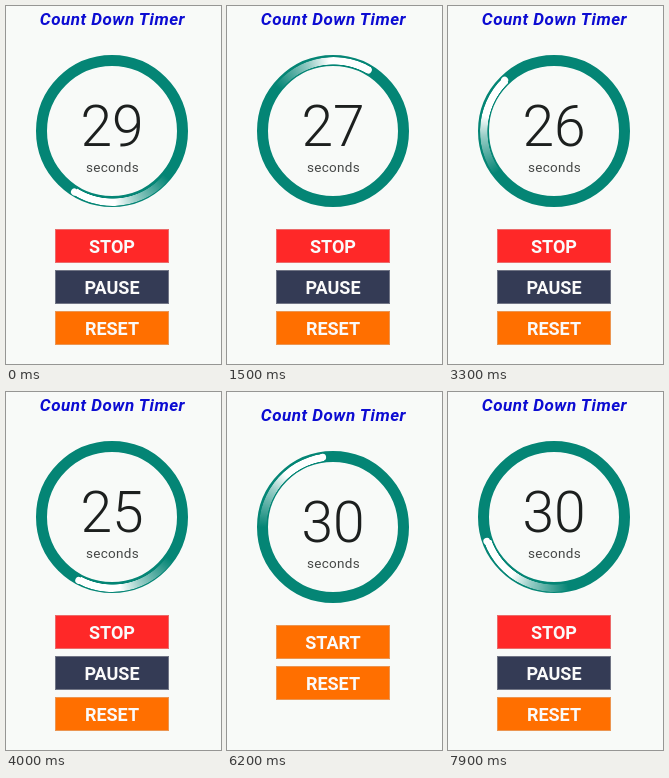
These frames come from a looping animation (215 px wide and 358 px high, 8000 ms). An HTML page:

```html
<!DOCTYPE html>
<html lang="en">
<head>
<meta charset="utf-8">
<title>Count Down Timer</title>
<style>
  html, body { margin: 0; width: 100%; height: 100%; overflow: hidden; background: #f8faf8; }
  #app { position: absolute; left: 0; top: 0; width: 215px; height: 358px; font-family: Roboto, sans-serif; }
  #app > * { position: absolute; box-sizing: border-box; }
  .line { left: 0; width: 213px; text-align: center; white-space: nowrap; }
  #title { top: 3px; line-height: 21px; font-size: 17px; font-weight: 700; font-style: italic; letter-spacing: .5px; color: #0c0cd2; }
  #count { top: 91px; width: 212px; line-height: 60px; font-size: 57px; font-weight: 350; color: #1c1f1e; }
  #unit { top: 152px; line-height: 18px; font-size: 13.5px; letter-spacing: .3px; color: #454746; }
  #ring { left: 30px; top: 49px; width: 152px; height: 152px; border: 11px solid #048575; border-radius: 50%; }
  #sweep {
    left: 31.5px; top: 50.5px; width: 149px; height: 149px; border-radius: 50%;
    background: conic-gradient(from -82deg, #fff0, #fff9 32deg, #fff 48deg, #fff 82deg, #fff0 82deg);
    -webkit-mask: radial-gradient(circle closest-side, #0000 66.8px, #000 67.4px);
    mask: radial-gradient(circle closest-side, #0000 66.8px, #000 67.4px);
  }
  #cap { left: 102.3px; top: 50.5px; width: 7.4px; height: 7.4px; border-radius: 50%; background: #fff; transform-origin: 3.7px 74.5px; }
  .btn {
    left: 49px; width: 114px; height: 34px; line-height: 35px; text-align: center;
    font-size: 18px; font-weight: 600; color: #fafafa; box-shadow: inset 0 0 0 1px #ccc6;
  }
</style>
</head>
<body>
<div id="app">
  <div id="title" class="line">Count Down Timer</div>
  <div id="ring"></div>
  <div id="sweep"></div>
  <div id="cap"></div>
  <div id="count" class="line"></div>
  <div id="unit" class="line">seconds</div>
</div>
<script>
  const LOOP = 8000, STEP = 100;      // ms
  const SPIN = 0.359;                 // degrees per ms
  const REST = 352;                   // head angle before a run
  const LEAD = 1615;                  // ms already run when the loop opens
  const STOPPED = 4465, RESET = 6100, STARTED = 7180;

  const $ = id => document.getElementById(id);
  const app = $('app');

  const COLORS = { START: '#ff6f00', STOP: '#ff2828', PAUSE: '#343b55', RESET: '#ff6f00' };
  const buttons = {};
  for (const label in COLORS) {
    const b = buttons[label] = document.createElement('div');
    b.className = 'btn';
    b.textContent = label;
    b.style.background = COLORS[label];
    app.append(b);
  }

  const elapsed = t => t < RESET ? LEAD + Math.min(t, STOPPED) : Math.max(0, t - STARTED);

  // The reset screen slides up into place.
  const slide = t => t < RESET ? 0 : Math.round(19 * Math.exp((RESET - t) / 150));

  function menu(t) {
    if (t < STOPPED || t >= STARTED) return ['STOP', 'PAUSE', 'RESET'];
    return t < RESET ? ['RESET'] : ['START', 'RESET'];
  }

  function draw(t) {
    const run = elapsed(t);
    $('sweep').style.transform = $('cap').style.transform = `rotate(${REST + SPIN * run}deg)`;
    $('count').textContent = 30 - Math.floor(run / 1000);
    app.style.top = slide(t) + 'px';

    const shown = menu(t);
    for (const label in buttons) {
      const row = shown.indexOf(label);
      buttons[label].style.display = row < 0 ? 'none' : 'block';
      buttons[label].style.top = 223 + row * 41 + 'px';
    }
  }

  const start = performance.now();
  function tick() {
    const t = (performance.now() - start) % LOOP;
    draw(Math.floor(t / STEP) * STEP);
    requestAnimationFrame(tick);
  }
  tick();
</script>
</body>
</html>
```
